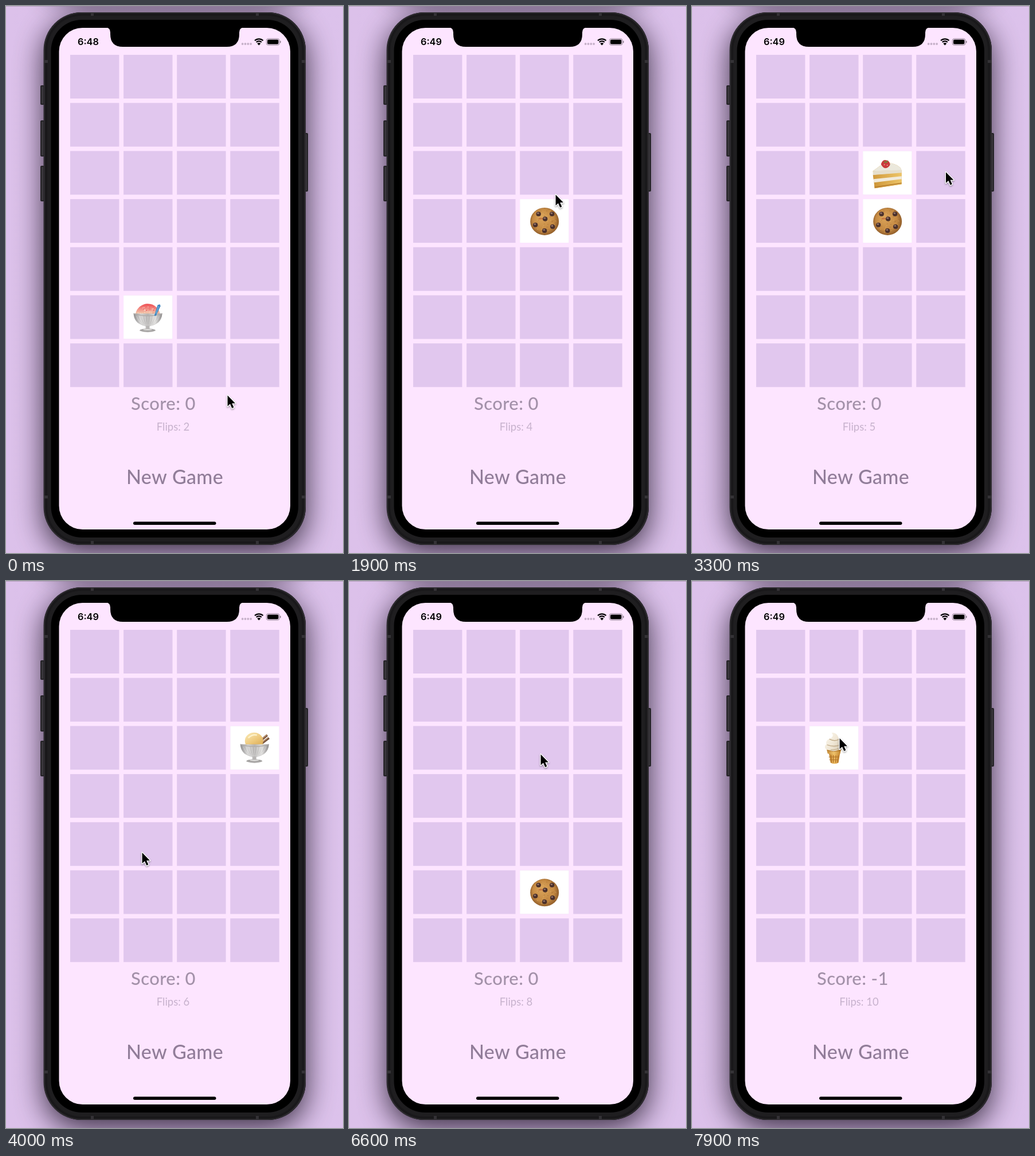
An HTML page with a canvas that plays this animation: 588x952 px, repeating every 8000 ms.

```html
<!DOCTYPE html>
<html lang="en">
<head>
<meta charset="utf-8">
<title>Memory game</title>
<style>
html, body { margin: 0; width: 100%; height: 100%; overflow: hidden; background: #dcc2eb; }
canvas { display: block; }
</style>
</head>
<body>
<canvas id="stage" width="588" height="952"></canvas>
<script>
const W = 588, H = 952, LOOP = 8000, STEP = 100;
const ctx = document.getElementById('stage').getContext('2d');
const backdrop = document.createElement('canvas');
backdrop.width = W;
backdrop.height = H;

// Cursor stops: time, x, y
const route = [
  [0, 386, 677], [250, 386, 677], [550, 351, 452], [1050, 352, 451], [1300, 364, 347],
  [1700, 363, 349], [2250, 353, 278], [2650, 353, 278], [3200, 443, 288], [3550, 440, 290],
  [4000, 237, 472], [4200, 152, 477], [4750, 150, 477], [5400, 353, 540], [5800, 353, 540],
  [6600, 334, 301], [7100, 336, 300], [7400, 255, 271], [7900, 257, 273], [8000, 257, 273]
];

// Each tap: time, flips so far, then the open cards as [column, row, picture]
const taps = [
  [0, 2, [1, 5, shavedIce]],
  [600, 3, [1, 5, shavedIce], [2, 4, cupcake]],
  [1500, 4, [2, 3, cookie]],
  [2400, 5, [2, 3, cookie], [2, 2, cake]],
  [3400, 6, [3, 2, sundae]],
  [4600, 7, [3, 2, sundae], [0, 4, chocolate]],
  [5600, 8, [2, 5, cookie]],
  [6700, 9, [2, 5, cookie], [2, 2, cake]],
  [7600, 10, [1, 2, softServe]]
];

function fade(c, x0, y0, x1, y1, ...colors) {
  const g = c.createLinearGradient(x0, y0, x1, y1);
  colors.forEach((col, i) => g.addColorStop(i / (colors.length - 1), col));
  return g;
}

function box(c, x, y, w, h, r, fill) {
  c.beginPath();
  c.roundRect(x, y, w, h, r);
  c.fillStyle = fill;
  c.fill();
}

function oval(c, x, y, rx, ry, fill, turn = 0) {
  c.beginPath();
  c.ellipse(x, y, rx, ry, turn, 0, Math.PI * 2);
  c.fillStyle = fill;
  c.fill();
}

function shape(c, d, fill, line, width = 1) {
  const p = new Path2D(d);
  if (line) {
    c.strokeStyle = line;
    c.lineWidth = width;
    c.stroke(p);
  }
  if (fill) {
    c.fillStyle = fill;
    c.fill(p);
  }
}

function label(c, str, x, y, font, color, align = 'left', gap = 0) {
  c.font = font;
  c.fillStyle = color;
  c.textAlign = align;
  c.letterSpacing = gap + 'px';
  c.fillText(str, x, y);
  c.letterSpacing = '0px';
}

function random(seed) {
  return () => {
    seed = (seed * 16807) % 2147483647;
    return seed / 2147483647;
  };
}

function drawBackdrop(c) {
  c.fillStyle = fade(c, 0, 0, W, 0, '#dcc1ea', '#d9bdeb', '#dcc2eb');
  c.fillRect(0, 0, W, H);

  c.save();
  c.shadowColor = 'rgba(12,4,18,.78)';
  c.shadowBlur = 52;
  c.shadowOffsetY = 15;
  box(c, 66, -946, 457, 924, 66, '#000');
  box(c, 66, 11, 457, 927, 66, '#000');
  c.restore();
  c.fillStyle = 'rgba(150,135,155,.6)';
  c.fillRect(0, 0, W, 1);

  // Side buttons
  for (const [x, y, h] of [[60, 138, 34], [60, 199, 63], [60, 278, 62], [520, 221, 102]]) {
    box(c, x, y, 7, h, 2, '#252327');
    box(c, x + 2, y + 2, 3, h - 4, 1, '#39363b');
  }

  // Body, rim and bezel
  box(c, 65.5, 11, 457.5, 927, 66, '#2c2a2e');
  box(c, 68, 13, 452.5, 923, 64, '#19181a');
  box(c, 72, 17, 444.5, 915, 60, '#1f1e20');
  c.fillStyle = '#343236';
  for (const y of [94, 852]) {
    c.fillRect(66, y, 7, 5);
    c.fillRect(516, y, 7, 5);
  }
  for (const x of [148, 436]) {
    c.fillRect(x, 12, 5, 5);
    c.fillRect(x, 931, 5, 6);
  }
  box(c, 78.5, 24, 431.5, 901, 54, '#000');
  box(c, 92.5, 38, 403.5, 873, 41, '#fde5ff');
  shape(c, 'M174 37 Q182 38 182 46 V49 Q182 71 204 71 H385 Q407 71 407 49 V46 Q407 38 415 37Z', '#000');

  // Status icons
  for (let i = 0; i < 4; i++) oval(c, 412.7 + i * 4.8, 66, 1.9, 1.9, '#c6b1c9');
  c.lineWidth = 2.3;
  c.strokeStyle = '#000';
  for (const r of [10.2, 6.4]) {
    c.beginPath();
    c.arc(441.3, 67.5, r, -Math.PI * 0.75, -Math.PI * 0.25);
    c.stroke();
  }
  shape(c, 'M441.3 68.5 L438.3 65.2 Q441.3 62.6 444.3 65.2Z', '#000');
  c.beginPath();
  c.roundRect(454.4, 56.9, 22.6, 11.2, 3.2);
  c.strokeStyle = '#8f8190';
  c.lineWidth = 1;
  c.stroke();
  box(c, 456, 58.5, 19.4, 8, 1.8, '#000');
  box(c, 478, 60.6, 1.5, 4, 1, '#8f8190');

  for (let row = 0; row < 7; row++)
    for (let col = 0; col < 4; col++)
      paintCard(c, col, row, '#e1c7ee');

  label(c, 'New Game', 294.5, 832, '500 34px Lato, sans-serif', '#917d99', 'center', 0.3);
  box(c, 222, 897.5, 144.5, 5.5, 2.75, '#000');
}

function paintCard(c, col, row, fill) {
  c.fillStyle = fill;
  c.fillRect(112 + col * 93.1, 85 + row * 83.7, 85.4, 76);
}

// Pictures are drawn around the middle of a card
function bowl(c) {
  shape(c, 'M-25 -6 C-24 9 -14 14 -4 16 L-4 20 Q-14 21 -15 24 Q0 29 14 24 Q13 21 3 20 L3 16 C15 14 24 8 25 -6Z',
    fade(c, -25, 0, 25, 0, '#8f8e8e', '#d4d3d2', '#b5b3b2', '#dddcda', '#8d8b8b'));
  for (let x = -20; x <= 20; x += 5)
    shape(c, `M${x} -2 Q${x * 0.8} 10 ${x * 0.25} 15`, null, 'rgba(255,255,255,.42)', 0.9);
  shape(c, 'M-25 -6 Q0 2 25 -6', null, '#b0adab', 1.6);
  oval(c, -0.5, 23, 13.5, 2.6, '#a5a3a2');
  oval(c, -0.5, 22, 8, 1.2, '#dedddb');
}

function shavedIce(c) {
  shape(c, 'M-22 -3 C-21 -15 -11 -23 0 -23 C12 -23 20 -14 22 -3 Q0 6 -22 -3Z',
    fade(c, 0, -23, 0, 2, '#ef4b50', '#f28a82', '#f1c5a8', '#ecd9c9'));
  const rnd = random(7);
  for (let i = 0; i < 46; i++) {
    const a = Math.PI * (1 + rnd()), r = 20 * Math.sqrt(rnd());
    oval(c, Math.cos(a) * r, Math.sin(a) * r - 1, 0.9, 0.9, i % 2 ? 'rgba(255,235,220,.55)' : 'rgba(226,50,60,.38)');
  }
  bowl(c);
  shape(c, 'M11 -2 L17 -21 L21 -22 L22 -19 L14 -2Z', '#3f86bf');
  shape(c, 'M14 -6 L19 -19', null, '#79b6dd', 1.2);
}

function sundae(c) {
  shape(c, 'M10 -12 L22 -22 M13 -8 L25 -17', null, '#75523c', 4);
  shape(c, 'M11 -14 L22 -23 M14 -10 L24 -18', null, '#c59a73', 1.4);
  oval(c, -1, -12, 16, 14.5, fade(c, -10, -26, 8, 2, '#f8e4ae', '#edc87b', '#d7a650'));
  shape(c, 'M-19 -4 Q-14 -9 -9 -5 Q-2 -9 4 -5 Q11 -10 19 -4 Q0 5 -19 -4Z', '#e4bc6b');
  shape(c, 'M-11 -17 Q-4 -24 4 -22', null, 'rgba(255,248,215,.8)', 2.5);
  bowl(c);
}

function cupcake(c) {
  shape(c, 'M-22 1 H22 L16 26 Q0 31 -16 26Z', fade(c, -22, 0, 22, 0, '#b9782a', '#e9ad4b', '#d99434', '#edb554', '#b16e25'));
  for (let i = -4; i <= 4; i++)
    shape(c, `M${i * 4.8} 3 L${i * 3.6} 27`, null, i % 2 ? '#f3c874' : '#a9651f', 1.3);
  shape(c, 'M-22 -1 C-23 -9 -17 -12 -14 -12 C-15 -18 -9 -20 -6 -21 C-5 -26 3 -28 5 -22 C12 -21 15 -16 14 -12 C20 -11 24 -5 22 0 Q18 7 12 3 Q7 8 1 4 Q-5 8 -10 4 Q-18 8 -22 -1Z',
    fade(c, 0, -26, 0, 6, '#f4f0ea', '#e9e1d9', '#d9cdc4'));
  shape(c, 'M-17 -4 Q-2 4 17 -7 M-11 -13 Q0 -8 11 -15 M-4 -21 Q1 -18 5 -20', null, '#c9bcb4', 1.2);
  const rnd = random(31), tints = ['#c04460', '#6d8fc4', '#71a65a', '#d8a33b', '#7d4a66'];
  for (let i = 0; i < 24; i++) {
    const y = -22 + rnd() * 23, half = 7 + (y + 22) * 0.55;
    oval(c, (rnd() * 2 - 1) * half, y, 1.6, 0.8, tints[i % 5], rnd() * 3);
  }
}

function cake(c) {
  shape(c, 'M-25 -3 L-10 -14 Q2 -20 15 -14 Q24 -10 25 -4 L25 20 L-22 27Z', '#d8a64a');
  shape(c, 'M-25 -3 L-10 -14 Q2 -20 15 -14 Q24 -10 25 -4Z', '#ebe8dc');
  shape(c, 'M-25 -3 L25 -5 L25 1 L-25 4Z', '#e6dfcd');
  shape(c, 'M-25 4 L25 0 L25 7 L-24 12Z', fade(c, -25, 0, 25, 0, '#d19a3d', '#edc568'));
  shape(c, 'M-24 11 L25 6 L25 12 L-23 18Z', '#f1eadb');
  shape(c, 'M-23 17 L25 11 L25 20 L-22 27Z', fade(c, -25, 0, 25, 0, '#cc9335', '#edc568'));
  shape(c, 'M-22 25 L25 18', null, '#b57b2d', 1.4);
  shape(c, 'M-11 -15 Q-8 -23 -3 -22 Q4 -22 5 -14 Q2 -8 -4 -8 Q-8 -9 -11 -15Z', '#c93a3c');
  shape(c, 'M-7 -21 L-3 -19 L2 -22 L0 -18 L-4 -17Z', '#6f8d3a');
  oval(c, -5, -14, 1, 1, '#efa18d');
  oval(c, 0, -13, 1, 1, '#efa18d');
}

function cookie(c) {
  const g = c.createRadialGradient(-5, -7, 3, 0, 0, 25);
  g.addColorStop(0, '#d9a258');
  g.addColorStop(0.7, '#c58a43');
  g.addColorStop(1, '#94602b');
  oval(c, 0.5, 1, 25, 24, g);
  const rnd = random(19);
  for (let i = 0; i < 40; i++) {
    const a = rnd() * 6.3, r = 22 * Math.sqrt(rnd());
    oval(c, Math.cos(a) * r, Math.sin(a) * r, 1, 0.7, i % 2 ? 'rgba(238,190,115,.5)' : 'rgba(135,82,34,.35)');
  }
  oval(c, -6, -4, 4, 1.5, 'rgba(190,100,55,.7)');
  for (const [x, y] of [[-10, -12], [13.5, -12], [1.5, -3.5], [-15.5, 7], [14.5, 10], [0.5, 17]]) {
    oval(c, x, y, 4.2, 4, '#4a302b');
    oval(c, x - 0.8, y - 1.2, 1.9, 1.4, '#927369');
  }
}

function chocolate(c) {
  c.save();
  c.rotate(Math.PI * 0.25);
  // Long side runs along x
  box(c, -25, -13, 27, 26, 1, '#54301f');
  for (let i = 0; i < 3; i++)
    for (let j = 0; j < 3; j++) {
      box(c, -24 + i * 8.2, -12 + j * 8.3, 7.2, 7.2, 1, '#7b4c35');
      box(c, -23 + i * 8.2, -10.5 + j * 8.3, 5, 4.5, 1, '#8d5d43');
    }
  box(c, 3, -13.5, 23, 27, 1, fade(c, 0, -13, 0, 13, '#ef5042', '#dc2023', '#b5181c'));
  shape(c, 'M-3 -14 L1 -11 L-3 -8 L2 -4 L-2 0 L1 4 L-3 8 L1 11 L-2 14 H6 L4 8 L7 3 L4 -3 L7 -8 L5 -14Z',
    fade(c, 0, -14, 0, 14, '#bfc2c4', '#eeeeed', '#9fa3a6', '#d8d9da'));
  for (let y = -11; y < 13; y += 4) shape(c, `M22 ${y} H26`, null, '#8f1519', 1);
  c.restore();
}

function softServe(c) {
  shape(c, 'M-9 8 H11 L8 26 Q1 30 -6 26Z', fade(c, -9, 0, 11, 0, '#bf812f', '#efbd62', '#c38430'));
  shape(c, 'M-13 0 H13 L11 10 Q0 14 -11 10Z', fade(c, -13, 0, 13, 0, '#c18836', '#efc26c', '#bd8029'));
  for (let x = -5; x <= 8; x += 4.2) shape(c, `M${x} 13 L${x * 0.85} 26`, null, '#a96b24', 1.1);
  shape(c, 'M-9 16 H9 M-8 21 H8 M-12 5 Q0 8 12 5', null, '#b27529', 1);
  shape(c, 'M-4 -26 C3 -27 8 -21 8 -16 C14 -15 16 -9 14 -5 C18 -1 13 5 7 4 Q-1 8 -8 4 C-16 4 -18 -3 -13 -6 C-15 -12 -10 -15 -7 -16 C-2 -18 0 -22 -4 -26Z',
    fade(c, -15, -20, 15, 0, '#faf5e9', '#f0e7d6', '#d6c8af'));
  shape(c, 'M-12 -5 Q2 0 13 -6 M-8 -15 Q2 -10 9 -15 M-6 4 Q5 4 12 -1', null, '#c2ad8c', 1.4);
}

function drawCursor(c, x, y) {
  const d = 'M0 0 V18.8 L4.4 14.7 L7.7 22.2 L10.8 20.8 L7.6 13.6 H13.4Z';
  c.save();
  c.translate(x + 0.6, y + 0.8);
  c.lineJoin = 'round';
  c.shadowColor = 'rgba(0,0,0,.35)';
  c.shadowBlur = 3;
  c.shadowOffsetY = 1.5;
  shape(c, d, null, '#fff', 2.8);
  c.shadowColor = 'transparent';
  shape(c, d, '#000');
  c.restore();
}

function cursorAt(t) {
  const i = route.findIndex(stop => stop[0] > t);
  const [t0, x0, y0] = route[i - 1], [t1, x1, y1] = route[i];
  const u = (t - t0) / (t1 - t0), e = u * u * (3 - 2 * u);
  return [x0 + (x1 - x0) * e, y0 + (y1 - y0) * e];
}

function render(t) {
  const [, flips, ...open] = taps.findLast(tap => tap[0] <= t);
  ctx.drawImage(backdrop, 0, 0);
  for (const [col, row, picture] of open) {
    paintCard(ctx, col, row, '#fff');
    ctx.save();
    ctx.translate(154.5 + col * 93.1, 122.8 + row * 83.7);
    picture(ctx);
    ctx.restore();
  }
  label(ctx, t < 300 ? '6:48' : '6:49', 125, 68.3, '600 16.3px Inter, sans-serif', '#000');
  label(ctx, 'Score: ' + (t < 6700 ? '0' : '-1'), 218, 703, '500 31px Lato, sans-serif', '#a391a9', 'left', 0.4);
  label(ctx, 'Flips: ' + flips, 291.5, 738.5, '400 18.5px Lato, sans-serif', '#c7b2cd', 'center');
  drawCursor(ctx, ...cursorAt(t));
}

function tick() {
  const t = performance.now() % LOOP;
  render(Math.floor(t / STEP) * STEP);
  requestAnimationFrame(tick);
}

drawBackdrop(backdrop.getContext('2d'));
tick();
</script>
</body>
</html>
```
